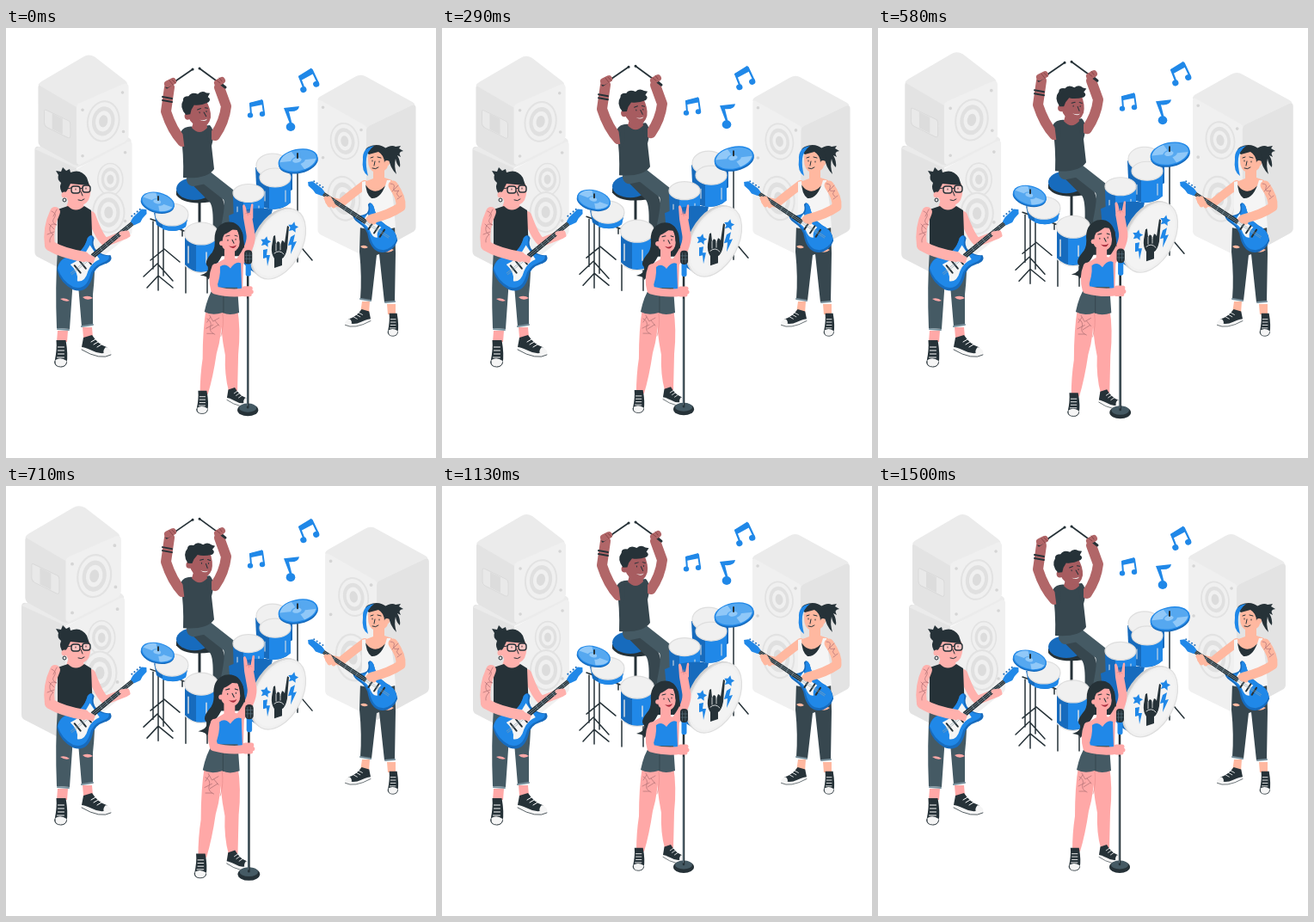
These frames come from a looping animation (500x500 px, 1.54 s). An HTML page:

```html
<!DOCTYPE html>
<html lang="en">
<head>
<meta charset="utf-8">
<title>Band on stage</title>
<style>
html, body { margin: 0; width: 100%; height: 100%; overflow: hidden; background: #fff }
svg { display: block; width: 100vw; height: 100vh }
.line { fill: none; stroke-linecap: round; stroke-linejoin: round }
.dark { fill: #263238 } .slate { fill: #455a64 } .coal { fill: #37474f }
.blue { fill: #2088e8 } .deep { fill: #176bbd } .sky { fill: #56a8f0 } .shine { fill: #90c8f8 }
.white { fill: #f5f5f5 } .pale { fill: #f0f0f0 } .side { fill: #e3e3e3 } .top { fill: #ebebeb }
.ink { stroke: #263238 } .thin { stroke-width: 1 } .rim { stroke: #dedede; stroke-width: 1.2 }
.rose { fill: #ffa8a7 } .peach { fill: #ffb8a0 } .brown { fill: #a75c60 }
.roseLine { stroke: #ffa8a7 } .peachLine { stroke: #ffb8a0 } .brownLine { stroke: #b16668 }
.blush, .blushLine { --skin: #ffb1ad } .blush { fill: var(--skin) } .blushLine { stroke: var(--skin) }
.tattoo { stroke: #b7777a; stroke-width: .8 }
</style>
</head>
<body>
<svg viewBox="0 0 500 500">
<defs>
  <g id="cone">
    <ellipse rx="19" ry="24" fill="#e2e2e2"/><ellipse rx="17" ry="22" class="pale"/>
    <ellipse rx="13" ry="17" fill="#e0e0e0"/><ellipse rx="9" ry="12" class="pale"/>
    <ellipse rx="5" ry="7" fill="#dcdcdc"/>
  </g>
  <g id="sideShoe">
    <path class="white" d="M0 10Q15 19 33 19Q36 24 31 25Q20 26 10 20L0 17z"/>
    <path class="dark" d="M2 3L12 0Q19 11 29 14L32 19Q23 24 12 18Q3 14 0 14z"/>
    <path class="white" d="M28 14Q36 17 34 22Q30 25 26 22Q24 18 28 14z"/>
    <path class="line" stroke="#fff" d="M11 8l5-3M14 11l5-3M18 14l5-3"/>
    <path class="line ink" stroke-width=".8" d="M0 17Q22 30 34 23"/>
  </g>
  <g id="frontShoe">
    <path class="dark" d="M2 1H13Q16 18 14 28Q12 33 6 32Q0 31 0 26Q3 12 2 1z"/>
    <path class="white" d="M1 24Q7 20 14 25Q14 32 7 32Q0 32 1 24z"/>
    <path class="line" stroke="#fff" d="M4 9h7M4 13h7M4 17h7M3 21h8"/>
    <path class="line ink" stroke-width=".8" d="M0 26Q0 32 7 32Q13 32 14 27"/>
  </g>
  <g id="guitarBody">
    <path class="deep" d="M-27-14Q-16-24-4-16Q10-10 24-20Q32-22 30-15Q22-10 23-2Q25 8 32 12Q31 20 20 16Q8 11-1 19Q-18 30-27 16Q-34 1-27-14z"/>
    <path class="blue" d="M-25-15Q-15-23-4-16Q10-10 24-20Q31-22 28-16Q20-10 21-3Q23 7 30 11Q29 17 19 13Q7 9-2 16Q-17 26-25 13Q-31-1-25-15z"/>
  </g>
  <path id="pickguard" class="white" d="M-11-9Q6-5 21-12L19 8Q9 5 0 10Q-11 18-17 11Q-9 4-11-9z"/>
  <g id="guitarNeck">
    <path class="line ink" stroke-width="2" d="M-8-5V6M0-5V6M8-5V6"/>
    <path class="dark" d="M15-3L76-2.5V2.5L15 3z"/>
    <path class="line" stroke="#90a4ae" stroke-width=".6" d="M-17-1H77M-17 1H77M28-3V3M36-3V3M44-3V3M52-3V3M60-3V3M68-2V2"/>
    <path class="blue" d="M75-3L80-5L94-6L98-2L95 2L88 3L83 5L75 3z"/>
    <path class="line" stroke="#176bbd" stroke-width="2" stroke-dasharray=".1 4" d="M80-7H95"/>
  </g>
  <g id="pair">
    <path class="line" stroke="#2088e8" stroke-width="2" d="M-6 7L-7-6L7-9L9 5"/>
    <path class="blue" d="M-8-7L7-11L8-5L-7-2z"/>
    <ellipse class="blue" cx="-7" cy="7.500" rx="3.200" ry="3"/><ellipse class="blue" cx="7" cy="6" rx="3.200" ry="3"/>
  </g>
  <g id="cymbal">
    <ellipse class="deep" cy="1.700" rx="22" ry="12.500"/><ellipse class="blue" rx="22" ry="12.500"/>
    <ellipse class="sky" rx="20.500" ry="11.300"/>
    <path class="shine" d="M0 0L-20-2Q-16-10-5-11zM0 0L20 2Q16 9 5 11z"/>
    <ellipse class="sky" rx="8" ry="4.500"/><ellipse class="shine" cx="-1" cy="-.5" rx="5" ry="2.700"/>
  </g>
  <path id="star" class="blue" d="M0-6L2-2L6-1L3 2L4 6L0 4L-4 6L-3 2L-6-1L-2-2z"/>
</defs>

<g id="leftStack">
  <path class="side" d="M36 142Q36 138 40 138L84 158V287Q80 287 78 285L39 265Q36 263 36 259z"/>
  <path class="top" d="M36 141L95 110L144 128Q149 131 146 135L84 163z"/>
  <path class="pale" d="M84 164L143 133Q148 131 148 136V235Q148 239 144 241L88 286Q84 288 84 284z"/>
  <use href="#cone" transform="translate(123 176) scale(.8)"/>
  <use href="#cone" transform="translate(121 214)"/>
  <path class="side" d="M40 70Q40 66 44 66L86 88V160L81 159L43 138Q40 136 40 132z"/>
  <path class="top" d="M40 67Q41 65 44 63L92 35Q98 31 105 35L140 62Q145 66 140 69L86 94z"/>
  <path class="pale" d="M84 93Q84 90 88 88L138 66Q144 64 144 70V125Q144 130 139 133L89 158Q84 160 84 155z"/>
  <path fill="#e9e9e9" stroke="#dadada" d="M49 96L74 108Q77 109 77 113V126Q77 129 74 128L50 116Q47 114 47 111V98Q47 95 49 96z"/>
  <path fill="#dcdcdc" d="M56 100L68 106V124L56 118z"/>
  <use href="#cone" transform="translate(115 109) rotate(10)"/>
  <path class="line" stroke="#d5d5d5" stroke-width="3.500" d="M91 96h.1M137 76h.1M138 121h.1M91 149h.1M140 145h.1M140 224h.1"/>
</g>

<g id="rightStack">
  <path class="top" d="M361 85Q361 82 365 80L404 58Q411 54 417 58L470 87Q475 90 471 94L418 120z"/>
  <path class="pale" d="M361 87Q361 83 366 86L414 113Q418 115 418 120V266L365 240Q361 238 361 234z"/>
  <path class="side" d="M417 120Q417 116 421 114L469 91Q474 89 474 94V231Q474 235 470 237L417 266z"/>
  <use href="#cone" transform="translate(392 132) rotate(-10) scale(.88 .9)"/>
  <use href="#cone" transform="translate(391 198) rotate(-10) scale(1 1.1)"/>
  <path class="line" stroke="#d5d5d5" stroke-width="3.500" d="M367 93h.1M411 119h.1M367 151h.1"/>
</g>

<g id="drumGroup">
  <use href="#pair" transform="translate(291 94)"/>
  <use href="#pair" transform="translate(351 61) rotate(-17) scale(1.15)"/>
  <path class="blue" d="M323 93L341 91Q340 98 329 97L333 113L331 114z"/>
  <ellipse class="blue" cx="331" cy="115" rx="5.300" ry="5"/>

  <path class="line ink" stroke-width="1.500" d="M177 205V305M171 225V280M183 230V288M160 289L176 274L194 294M164 302L177 288L194 302M168 270L184 257L202 272M209 255V308M234 275V308M339 150V272M339 250L356 270M339 258L326 272M168 222L210 237M205 235v7"/>
  <path class="line ink" stroke-width="3" d="M225 196V250"/>
  <path class="dark" d="M198 189V194Q207 207 240 202V190z"/>
  <ellipse class="deep" cx="219" cy="187" rx="21" ry="13"/>
  <path class="line" stroke="#37474f" stroke-width="15" d="M222 177L243 198Q249 206 248 232"/>
  <path class="line" stroke="#455a64" stroke-width="16" d="M218 176L232 173L260 195Q264 204 258 232"/>

  <path class="coal" d="M203 121Q208 113 219 115L237 113Q244 120 239 137L242 164Q234 176 206 174Q207 147 203 121z"/>
  <path class="line brownLine" stroke-width="12" d="M205 132Q193 119 186 97L190 69"/>
  <path class="line brownLine" stroke-width="12" d="M243 125Q254 109 256 91L248 69"/>
  <path class="coal" d="M205 119L213 115L212 136L208 143zM232 114L239 116L239 136L235 132z"/>
  <path class="brown" d="M218 109H233L234 116Q225 126 216 116z"/>
  <path class="line ink" stroke-width="2" d="M182 84L193 86M182 80L193 82"/>
  <path class="line ink" stroke-width="1.800" d="M188 68L217 48M255 69L225 47"/>
  <path class="line ink" stroke-width="3" d="M187 69L197 62M255 69L246 62M217 48h.1M225 47h.1"/>
  <path class="line brownLine" stroke-width="8" d="M188 65L194 62M246 64L251 61"/>
  <path class="line" stroke="#7f4043" stroke-width=".8" d="M190 61l4 5M193 60l4 4M245 61l4 3M248 58l3 4"/>
  <g id="drummerHead">
    <path class="brown" d="M213 90Q219 83 236 85Q241 97 239 106Q235 117 226 115Q216 113 213 101z"/>
    <circle class="brown" cx="213" cy="101" r="4"/>
    <path class="dark" d="M211 99Q204 89 210 82Q210 77 217 78Q221 73 228 77Q233 73 238 77L242 78L239 82Q243 85 239 88Q229 91 222 89L218 94L216 99z"/>
    <path class="line ink thin" d="M225 95l4-1M234 94l3 1M227 98v1M235 98v1M232 99l2 5"/>
    <path class="white" d="M226 107Q231 109 235 107Q232 111 226 107z"/>
  </g>

  <path class="deep" d="M172 215L212 218L209 231Q193 242 175 229z"/>
  <path class="blue" d="M182 227L212 216L209 231Q199 239 182 234z"/>
  <ellipse class="pale rim" cx="193" cy="217" rx="19" ry="13"/>
  <use href="#cymbal" transform="translate(176.500 202.500) rotate(14) scale(.9)"/>
  <path class="line ink" stroke-width="2" d="M177 196v4"/>

  <path class="deep" d="M208 240H247V275Q230 293 208 277z"/>
  <path class="blue" d="M221 252L247 245V275Q239 285 221 283z"/>
  <path class="line" stroke="#e5e5e5" stroke-width="1.400" d="M208 276Q220 289 240 282M212 254v19M233 261v12"/>
  <ellipse class="pale rim" cx="227" cy="239" rx="19.500" ry="13"/>

  <path class="deep" d="M290 162H333V188Q315 199 291 183z"/>
  <ellipse class="pale rim" cx="310" cy="160" rx="19" ry="14"/>
  <path class="deep" d="M294 176H331V203Q317 216 295 207z"/>
  <path class="blue" d="M306 183L331 177V203Q323 211 306 211z"/>
  <ellipse class="pale rim" cx="313" cy="174" rx="18" ry="11"/>
  <path class="deep" d="M264 195H300V222Q285 239 265 228z"/>
  <path class="blue" d="M276 202L300 195V222Q290 232 276 232z"/>
  <path class="line" stroke="#e5e5e5" d="M269 208v14M294 207v14M301 190v11M325 189v13"/>
  <ellipse class="pale rim" cx="282" cy="192" rx="18" ry="10.500"/>
  <use href="#cymbal" transform="translate(339.500 154) rotate(-12) scale(1.060)"/>
  <path class="line ink" stroke-width="2" d="M339 146v5"/>

  <path class="deep" d="M259 218Q285 206 310 211L290 285Q262 270 259 218z"/>
  <g transform="translate(317 251) rotate(28)">
    <ellipse cx="-3" rx="27" ry="44" fill="#cfcfcf"/><ellipse rx="27" ry="44" class="pale rim"/>
    <ellipse rx="24.500" ry="40.500" fill="#f3f3f3"/>
  </g>
  <path class="dark" d="M309 254L311 242L313 241L314 251L316 248L318 249L319 253L321 247L323 248L324 250L327 230L329 231L327 256Q325 266 321 268L321 276L312 279L312 268Q308 262 309 254z"/>
  <path class="line" stroke="#fff" stroke-width=".8" d="M314 251v8M319 252v6M312 262Q318 257 323 263"/>
  <use href="#star" transform="translate(302 248) rotate(12)"/><use href="#star" transform="translate(334 231) rotate(12)"/>
  <path class="blue" d="M299 258L304 257L303 264L307 264L304 277L303 267L299 268zM331 243L336 240L334 249L338 248L331 263L332 252L328 253z"/>
</g>

<g>
  <path class="slate" d="M60 258H103Q104 283 101 310L101 345L88 347L83 287L78 292L74 350L59 349Q57 300 60 258z"/>
  <path class="line" stroke="#78909c" stroke-width="2" d="M60 350L73 351M88 347L101 345"/>
  <path class="rose" d="M60 352H72L71 365H59zM89 348H100L101 360H90zM63 315Q69 313 74 317Q69 319 63 315zM89 313Q96 310 101 314Q94 318 89 313z"/>
  <use href="#frontShoe" x="56.500" y="362"/><use href="#sideShoe" x="88" y="357"/>
  <path class="line blushLine" stroke-width="10" d="M99 218Q109 245 116 249L139 240"/>
  <path class="blush" d="M73 199H89L91 210Q80 219 70 209z"/>
  <path class="dark" d="M60 211L72 207Q81 216 91 207L99 212L101 263Q77 269 60 263z"/>
  <g transform="translate(89 275) rotate(-39.500)">
    <use href="#guitarBody"/><use href="#pickguard"/><use href="#guitarNeck"/>
  </g>
  <path class="line blushLine" stroke-width="12" d="M57 214Q48 233 51 253Q66 262 91 266"/>
  <path class="line blushLine" stroke-width="5" d="M90 263L101 268M91 268L100 271M134 239L141 238M136 243L142 241"/>
  <path class="line tattoo" d="M53 213q7 3 3 8t3 8q-7-3-8 3t4 8q-5 4-4 9M59 211l-4 8M50 228l6 6M48 240l8-3"/>
  <path class="blush" d="M68 184Q78 177 97 181Q100 191 96 200Q91 208 80 206Q70 203 68 190z"/>
  <path class="dark" d="M67 194Q61 187 64 180Q59 176 61 171L58 166L64 167L66 162L70 166L74 164L75 168Q87 163 94 174L97 183Q84 182 75 181L71 189z"/>
  <circle class="blush" cx="68" cy="194" r="3.500"/><circle cx="68" cy="200" r="2" fill="none" class="ink thin"/>
  <g fill="#ffc5c3" class="ink" stroke-width="1.400"><rect x="76" y="184" width="10" height="8" rx="3"/><rect x="89" y="183" width="9" height="8" rx="3"/></g>
  <path class="line ink thin" d="M70 187L76 186M86 187L89 186M81 187v1M93 186v1M87 190l2 5M84 200q4 2 7-1"/>
</g>

<g>
  <path class="dark" d="M439 141Q448 135 453 138L459 137L457 140L462 143Q455 144 459 150L455 148Q459 155 458 162Q454 159 453 152Q451 160 454 170Q446 162 445 151z"/>
  <path class="coal" d="M412 229H452L453 262L452 318L440 319L434 263L431 264L425 317L412 315Q414 290 411 260z"/>
  <path class="line" stroke="#78909c" stroke-width="2" d="M412 315L424 317M441 319L452 318"/>
  <path class="peach" d="M414 318H423L422 332H412zM443 321H453L453 333H444zM412 254Q417 251 421 255Q416 258 412 254zM439 259Q446 255 451 258Q445 263 439 259z"/>
  <use href="#sideShoe" transform="translate(424 327) scale(-.87 .8)"/>
  <use href="#frontShoe" transform="translate(444 331) scale(.82 .85)"/>
  <path class="line peachLine" stroke-width="10" d="M417 182Q401 194 389 204L376 201"/>
  <path class="peach" d="M427 164H440V174L449 177L446 209H415L414 180L427 175z"/>
  <path class="dark" d="M417 181L421 186Q429 193 437 187L446 179L445 204H416z"/>
  <path class="white" d="M414 179L418 178Q418 193 425 198Q437 199 443 177L447 177L451 207L453 232Q433 238 411 232L414 210z"/>
  <g transform="translate(431 234)">
    <use href="#guitarBody" transform="rotate(50) scale(-.95 .72)"/>
    <use href="#pickguard" transform="translate(-4 -3) rotate(40) scale(-.7 .6)"/>
    <use href="#guitarNeck" transform="rotate(33.500) scale(-.99 .9)"/>
  </g>
  <path class="line peachLine" stroke-width="11" d="M450 183Q460 197 459 208Q446 217 425 222"/>
  <path class="line peachLine" stroke-width="5" d="M421 222L428 226M372 198L376 206M376 198L381 207"/>
  <path class="line tattoo" d="M447 181q6 0 4 5t6 3q-5 4 0 7M449 190l7-7M455 199l5-4"/>
  <path class="peach" d="M421 148Q429 140 442 146Q447 156 443 163Q437 170 429 168Q421 165 421 154z"/>
  <path class="dark" d="M422 147Q414 142 422 138Q434 133 443 141Q449 151 444 159L440 157Q440 148 433 144z"/>
  <path class="blue" d="M428 137Q420 143 419 152Q418 160 421 172Q413 167 415 153Q414 139 428 137z"/>
  <circle class="peach" cx="443" cy="157" r="3"/>
  <path class="line ink thin" d="M424 151l3-1M432 150l4 1M426 154v1M434 155v1M429 155l-1 5M426 163q4 2 7-1"/>
</g>

<g id="singer">
  <path class="dark" d="M243 250Q241 232 255 227Q270 224 275 240L278 262L270 266H251Q246 276 240 279Q243 287 235 293Q236 289 226 288Q237 285 235 278Q230 274 238 264Q243 259 243 250z"/>
  <path class="line roseLine" stroke-width="10" d="M272 272Q287 252 284 239L281 222"/>
  <path class="rose" d="M276 222L275 208Q277 204 279 211L280 217L283 216L285 206Q288 204 287 210L287 222Q282 228 276 222z"/>
  <path class="line" stroke="#e78b8b" stroke-width=".8" d="M278 217q4-2 6 1M281 214v5"/>
  <path class="rose" d="M254 258H266V268L276 271L275 303H246L240 277L254 269z"/>
  <path class="rose" d="M233 326H251Q252 355 245 378Q241 405 235 425H226Q226 403 229 384Q229 350 233 326zM250 326H269Q273 350 270 379L269 421H259Q254 403 255 380Q249 350 250 326z"/>
  <path class="line" stroke="#e88e8e" stroke-width=".7" d="M252 332Q254 345 250 358"/>
  <path class="blue" d="M249 278Q255 273 261 280Q267 271 273 274L274 304H244Q250 290 249 278z"/>
  <path class="slate" d="M242 302H269L271 331Q260 335 252 331Q240 335 231 330Q235 311 242 302z"/>
  <path class="line" stroke="#37474f" d="M253 305V331M240 308L248 309"/>
  <path class="line tattoo" d="M234 338q6 3 4 9t5 9M233 349l8-4M237 334l4 7l7-4M239 350l8-5M234 355l7 0M243 340l5 6M238 336l-4 6"/>
  <use href="#frontShoe" transform="translate(222 420) scale(.9 .85)"/>
  <use href="#sideShoe" transform="translate(257 417) scale(.75 .85)"/>
  <path class="rose" d="M250 241Q256 234 269 236Q273 246 271 254Q268 262 260 261Q251 259 249 248z"/>
  <path class="dark" d="M266 233Q259 239 254 241Q251 246 252 252Q250 262 244 264Q242 237 253 229Q269 224 275 240L277 257Q271 251 271 243Q270 236 266 233z"/>
  <circle class="rose" cx="251" cy="251" r="2.800"/>
  <path class="line ink thin" d="M256 243l4-1M266 242l3 1M258 247v1M267 246v1M263 247l2 4"/>
  <path fill="#a92d3d" d="M259 254Q264 256 268 253Q265 260 259 254z"/>
  <ellipse class="dark" cx="281" cy="443" rx="12" ry="7"/>
  <ellipse class="slate" cx="281" cy="440.500" rx="10" ry="5"/>
  <path class="line ink" stroke-width="2.500" d="M281 285V440"/>
  <path class="line" stroke="#78909c" stroke-width=".7" d="M280.500 315V438"/>
  <rect class="blue" x="278.500" y="272" width="6" height="17" rx="2"/>
  <rect class="dark" x="277" y="259" width="9" height="16" rx="4"/>
  <path class="line" stroke="#546e7a" stroke-width=".7" d="M278 265H285M278 269H285M279.500 262V273M283 262V273"/>
  <path class="line roseLine" stroke-width="9" d="M244 279Q239 291 243 305Q262 310 278 307"/>
  <path class="line roseLine" stroke-width="5" d="M277 303H284M277 307H285M277 310H283"/>
</g>
</svg>
<script>
const LOOP = 1540, GROWTH = .08;
const byId = id => document.getElementById(id);
const set = (id, value) => byId(id).setAttribute("transform", value);

// A smooth swell of 350 ms, zero outside it.
const swell = (t, start) => t > start && t < start + 350 ? Math.sin(Math.PI * (t - start) / 350) ** 2 : 0;
const grow = (id, x, y, amount) =>
  set(id, `translate(${x} ${y}) scale(${1 + amount}) translate(${-x} ${-y})`);

function draw(now) {
  const t = now % LOOP;
  const beat = GROWTH * (swell(t, -40) + swell(t, 500) + swell(t, LOOP - 40));
  const lift = (1 - Math.cos(2 * Math.PI * t / LOOP)) / 2;
  grow("leftStack", 286, 170, beat);
  grow("rightStack", 213, 176, beat * .95);
  grow("singer", 262, 327, beat);
  set("drumGroup", `translate(0 ${-9 * lift})`);
  set("drummerHead", `rotate(${10 * lift - 8} 224 112)`);
}

const start = performance.now();
function tick() {
  draw(performance.now() - start);
  requestAnimationFrame(tick);
}
tick();
</script>
</body>
</html>
```
